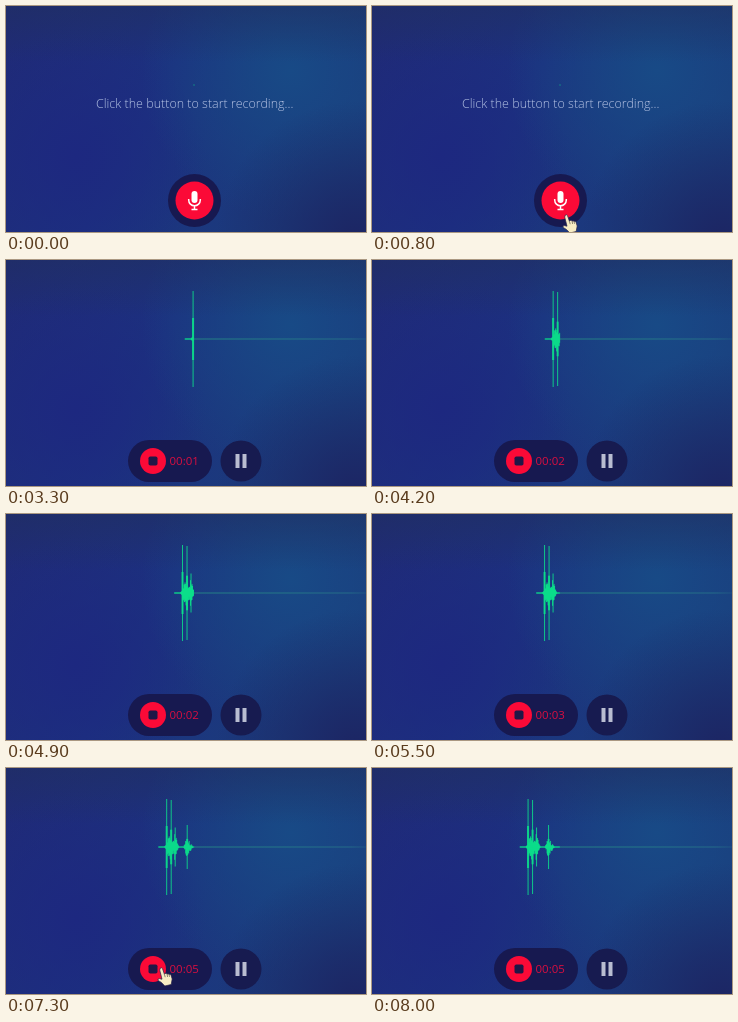
These frames come from a looping animation (360x226 px, 8100 ms). An HTML page:

```html
<!DOCTYPE html>
<html lang="en">
<head>
<meta charset="utf-8">
<title>Voice recorder</title>
<style>
  html, body { margin: 0; width: 100%; height: 100%; overflow: hidden; background: #1d2f7c; }
  svg { display: block; width: 100vw; height: 100vh; }
  text { font-family: "Open Sans", "Noto Sans", sans-serif; }
</style>
</head>
<body>
<svg viewBox="0 0 360 226">
  <defs>
    <linearGradient id="base" x1="0" y1="0" x2="1" y2="0.35">
      <stop offset="0" stop-color="#202a76"/>
      <stop offset="0.5" stop-color="#1c3180"/>
      <stop offset="1" stop-color="#1b3c7c"/>
    </linearGradient>
    <radialGradient id="glow" gradientUnits="userSpaceOnUse" cx="285" cy="65" r="150">
      <stop offset="0" stop-color="#184a86"/>
      <stop offset="1" stop-color="#184a86" stop-opacity="0"/>
    </radialGradient>
    <radialGradient id="indigo" gradientUnits="userSpaceOnUse" cx="70" cy="150" r="130">
      <stop offset="0" stop-color="#1d2880"/>
      <stop offset="1" stop-color="#1d2880" stop-opacity="0"/>
    </radialGradient>
    <linearGradient id="shade" x1="0" y1="0" x2="0" y2="1">
      <stop offset="0" stop-color="#20305c" stop-opacity="0.5"/>
      <stop offset="0.25" stop-color="#20305c" stop-opacity="0"/>
    </linearGradient>
    <radialGradient id="corner" gradientUnits="userSpaceOnUse" cx="350" cy="235" r="140">
      <stop offset="0" stop-color="#1c2563"/>
      <stop offset="1" stop-color="#1c2563" stop-opacity="0"/>
    </radialGradient>
    <linearGradient id="rail" gradientUnits="userSpaceOnUse" x1="188" y1="0" x2="360" y2="0">
      <stop offset="0" stop-color="#279886"/>
      <stop offset="0.9" stop-color="#28788a"/>
      <stop offset="1" stop-color="#28788a" stop-opacity="0.4"/>
    </linearGradient>
  </defs>
  <rect width="360" height="226" fill="url(#base)"/>
  <rect width="360" height="226" fill="url(#indigo)"/>
  <rect width="360" height="226" fill="url(#glow)"/>
  <rect width="360" height="226" fill="url(#corner)"/>
  <rect width="360" height="226" fill="url(#shade)"/>

  <text id="prompt" x="188.7" y="101.5" font-size="12.5" font-weight="300" text-anchor="middle" fill="#b3c1e3">Click the button to start recording...</text>

  <rect id="line" x="188" width="172" fill="url(#rail)"/>
  <path id="wave" fill="none" stroke="#0cec8c" stroke-width="0.8"/>

  <g id="pause">
    <circle r="20.5" fill="#171b50"/>
    <path d="M-5.5-7h4v14h-4zM1.5-7h4v14h-4z" fill="#b9bdd1"/>
  </g>
  <rect id="pill" fill="#171950"/>
  <circle id="red" fill="#fb0a37"/>
  <g id="mic">
    <rect x="-3" y="-9.5" width="6" height="12" rx="3"/>
    <path d="M-5.8-1.5v1a5.8 5.8 0 0 0 11.6 0v-1M0 5.3v3.7M-3 9h6" fill="none" stroke="currentColor" stroke-width="1.5"/>
  </g>
  <rect id="stop" width="9" height="9" rx="1.8" fill="#201747"/>
  <text id="timer" font-size="11.5" fill="#d90f40"></text>

  <g id="cursor">
    <path d="M0.3 0.2Q1.5-0.8 2.5 0.6L4.4 6.2L5.2 5.4Q6.4 5 7 6.2Q8.2 5.1 9 6.4Q10.3 5.8 11 7.2L12.2 11L11.2 16.5L4.8 18L1.4 14.4L-2 12.4Q-2.6 10.6-0.6 10.6L2 11.2L-0.3 2Z"
      fill="#f7edc4" stroke="#24204a" stroke-width="0.7" stroke-linejoin="round"/>
    <path d="M4.4 6.2L5.2 9.2M7 6.2L7.7 9M9 6.4L9.6 8.8" stroke="#5b5348" stroke-width="0.7"/>
  </g>
</svg>
<script>
const LOOP = 8100, STEP = 100, HEAD = 188, MID = 79, SPEED = 6.6, REC_START = 1950;
const $ = id => document.getElementById(id);
const set = (id, attrs) => { for (const k in attrs) $(id).setAttribute(k, attrs[k]); };
const show = (id, on) => set(id, { visibility: on ? "visible" : "hidden" });
const clamp = v => Math.max(0, Math.min(1, v));
const mix = (a, b, p) => a + (b - a) * p;

// Each trip: [time, x, y] of the fingertip; hidden between trips.
const trips = [
  [[300, 248, 94], [400, 225, 128], [500, 180, 175], [600, 133, 204], [700, 168, 208],
   [800, 193, 209], [2000, 193, 209], [2300, 200, 228]],
  [[6400, 169, 223], [6500, 167, 217], [6900, 154, 200], [7400, 154, 200], [7800, 19, 0]]
];

function cursorAt(t) {
  for (const trip of trips) {
    for (let i = 1; i < trip.length; i++) {
      const [t0, x0, y0] = trip[i - 1], [t1, x1, y1] = trip[i];
      if (t >= t0 && t <= t1) {
        const p = (t - t0) / (t1 - t0);
        return [mix(x0, x1, p), mix(y0, y1, p)];
      }
    }
  }
  return null;
}

// Loudness peaks: [position, height, width]; bursts: [centre, height, width].
const peaks = [[8, 48, 0.55], [12.5, 47, 0.5], [16.4, 20, 0.6], [28.5, 22, 0.5]];
const bursts = [[11.5, 15, 3.2], [16.5, 11, 2.4], [28.8, 11, 2.5], [32, 4, 2]];
const bump = (u, [c, h, w]) => h * Math.exp(-(((u - c) / w) ** 2));
const noise = n => { const v = Math.sin(n * 12.9898) * 43758.5453; return v - Math.floor(v); };

function loudness(u, seed) {
  const body = Math.max(...bursts.map(b => bump(u, b)));
  const spike = Math.max(...peaks.map(b => bump(u, b)));
  return Math.max(0.5, spike, body * (0.35 + 0.65 * noise(seed)));
}

function wavePath(t) {
  const length = Math.max(0, (t - REC_START) / 1000 * SPEED);
  let d = "";
  for (let i = 0; i * 0.5 <= length; i++) {
    const u = i * 0.5, x = (HEAD - length + u).toFixed(2);
    d += `M${x} ${(MID - loudness(u, i + 1)).toFixed(1)}V${(MID + loudness(u, i + 200)).toFixed(1)}`;
  }
  return d;
}

function drawControls(t) {
  const p = t < 1900 ? 0 : clamp(0.4 + (t - 1900) / 250);
  const settle = clamp((t - 2000) / 100);
  const open = clamp(p / 0.8);
  const left = mix(mix(162, 131, open), 122, settle);
  const right = mix(mix(215, 208, open), 206, settle);
  const cy = mix(mix(194.5, 199.5, open), 201, settle);
  const height = mix(mix(53, 43, open), 42, settle);
  set("pill", { x: left, y: cy - height / 2, width: right - left, height, rx: height / 2 });

  const cx = mix(mix(188.5, 151.5, open), 147, settle);
  set("red", { cx, cy, r: mix(mix(19, 12.5, open), 13, settle) });
  set("mic", {
    transform: `translate(${cx} ${cy}) scale(${mix(1, 0.75, open)})`,
    fill: p ? "#201747" : "#fff", color: p ? "#201747" : "#fff",
    opacity: mix(1, 0.75, open) * (1 - settle)
  });
  set("stop", { x: cx - 4.5, y: cy - 4.5, opacity: mix(open * 0.65, 1, settle) });

  show("pause", p > 0);
  set("pause", {
    transform: `translate(${mix(233, 235, settle)} ${cy}) scale(${mix(0.8 * open, 1, settle)})`
  });

  show("timer", p > 0);
  set("timer", { x: cx + 16.5, y: cy + 4.3, opacity: mix(open * 0.85, 1, settle) });
  const seconds = Math.max(0, Math.floor((t - 2100) / 1000));
  $("timer").textContent = "00:" + String(seconds).padStart(2, "0");
}

function draw(t) {
  show("prompt", t < 1700);
  show("line", t >= 1900);
  const thickness = t < 2200 ? 1.5 : 1;
  set("line", { y: MID - thickness / 2, height: thickness, opacity: t < 2200 ? 0.9 : 0.75 });
  set("wave", { d: wavePath(t) });
  drawControls(t);
  const at = cursorAt(t);
  show("cursor", at);
  if (at) set("cursor", { transform: `translate(${at[0]} ${at[1]})` });
}

const start = performance.now();
function tick() {
  const t = (performance.now() - start) % LOOP;
  draw(Math.floor(t / STEP) * STEP);
  requestAnimationFrame(tick);
}
tick();
</script>
</body>
</html>
```
